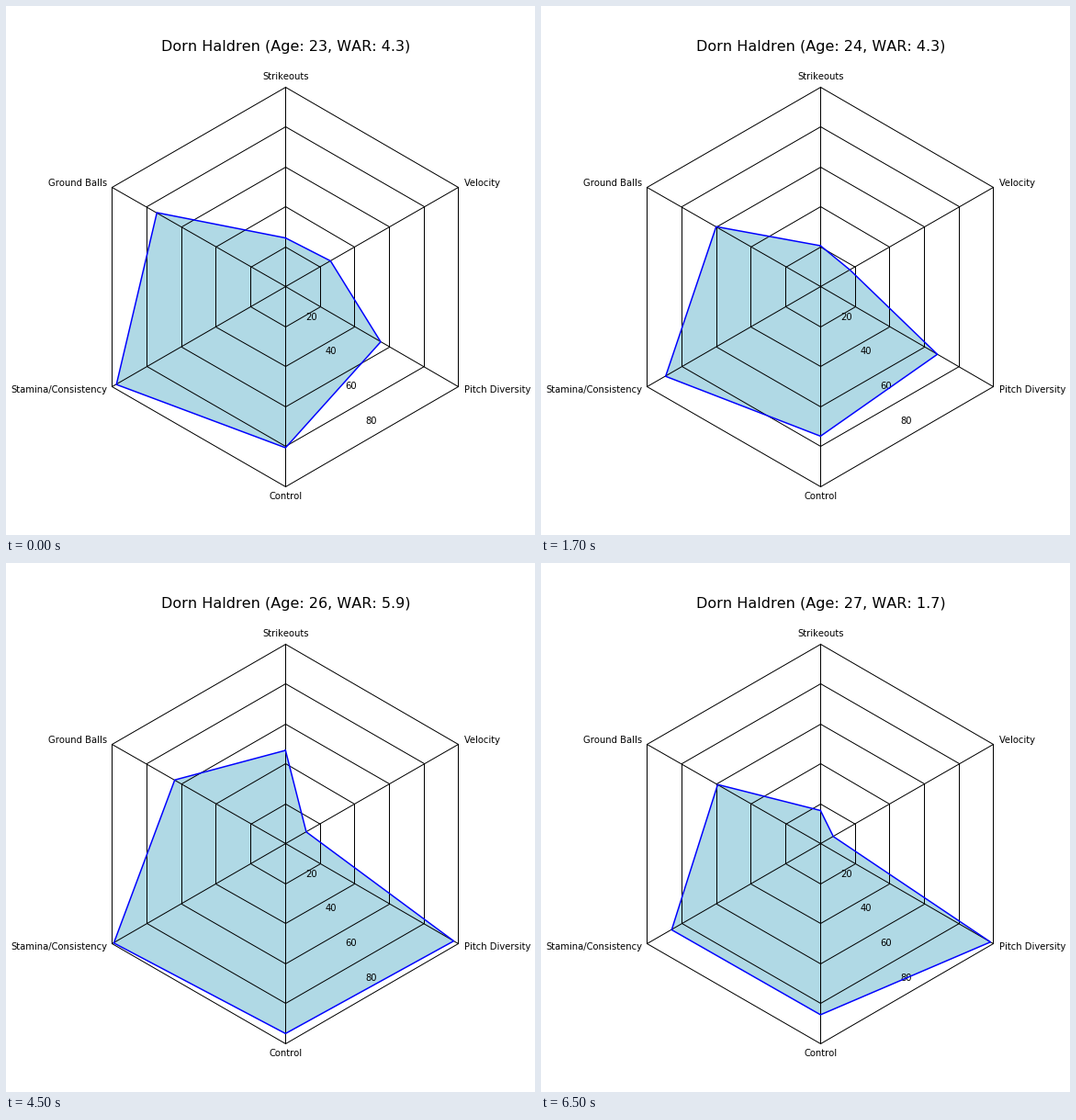
These frames come from a looping animation (576 px wide and 576 px high, 8000 ms). A matplotlib script:

```python
import numpy as np
import matplotlib.pyplot as plt
from matplotlib.animation import FuncAnimation

SIZE, DPI = 576, 72
CENTER = np.array([304.34, 305.85])
RADIUS = 217.6
LABEL_PAD = 6.8
NAME, FIRST_AGE = "Dorn Haldren", 23

# Clockwise from the top
AXES = ["Strikeouts", "Velocity", "Pitch Diversity", "Control",
        "Stamina/Consistency", "Ground Balls"]

# One season per entry: WAR and the percentile on each axis
SEASONS = [
    (4.3, [24.5, 26, 55, 80.5, 97.7, 74.3]),
    (4.3, [20.6, 17, 67.5, 74.7, 89.5, 60.3]),
    (4.5, [55.7, 16.2, 100, 91.8, 97.5, 78.7]),
    (5.9, [46.8, 12, 97.2, 94.9, 99.2, 64]),
    (1.7, [16.7, 7.4, 98.2, 85.5, 86, 59.4]),
]


def direction(degrees):
    """Unit vector, clockwise from the top, with y pointing down."""
    angle = np.radians(degrees)
    return np.stack([np.sin(angle), -np.cos(angle)], axis=-1)


SPOKES = direction(np.arange(0, 360, 60))


def hexagon(values):
    """Closed outline with the given percentile on each axis."""
    radii = np.broadcast_to(values, 6) * RADIUS / 100
    points = CENTER + SPOKES * radii[:, None]
    return np.vstack([points, points[:1]])


def draw_grid(points):
    # The half pixel makes snapping round down
    ax.plot(*(np.asarray(points) - 0.5).T, color="black", lw=1, snap=True,
            zorder=1.5)


plt.rcParams.update({"font.family": "DejaVu Sans", "font.size": 10,
                     "text.kerning_factor": 6})
fig = plt.figure(figsize=(SIZE / DPI, SIZE / DPI), dpi=DPI, facecolor="white")
ax = fig.add_axes([0, 0, 1, 1])
ax.set(xlim=(0, SIZE), ylim=(SIZE, 0))
ax.axis("off")

for level in range(20, 101, 20):
    draw_grid(hexagon(level))
    if level < 100:
        x, y = CENTER + direction(150) * RADIUS * level / 100
        ax.text(x, y, str(level), ha="left", va="bottom", zorder=1.6)

for name, spoke in zip(AXES, SPOKES):
    draw_grid([CENTER, CENTER + spoke * RADIUS])
    x, y = CENTER + spoke * (RADIUS + LABEL_PAD)
    side = int(np.sign(spoke[0].round(3)))
    # Text stands on its point at the top and hangs from it at the bottom
    baseline = y + 2.65 + 4.1 * spoke[1] ** 3
    ax.text(x, baseline, name, ha=("center", "left", "right")[side],
            va="baseline")

title = ax.text(CENTER[0], 49, "", fontsize=16, ha="center", va="baseline")
area, = ax.fill(*hexagon(0).T, color="#b0d9e5", lw=0, zorder=1)
outline, = ax.plot([], [], color="blue", lw=1.5, zorder=2)


def update(i):
    season = (i + 3) // 4  # the first season shows for one step, then four each
    war, values = SEASONS[season]
    points = hexagon(values)
    area.set_xy(points)
    outline.set_data(*points.T)
    title.set_text(f"{NAME} (Age: {FIRST_AGE + season}, WAR: {war})")
    return area, outline, title


anim = FuncAnimation(fig, update, frames=16, interval=500, repeat=True,
                     repeat_delay=0)
plt.show()
```
